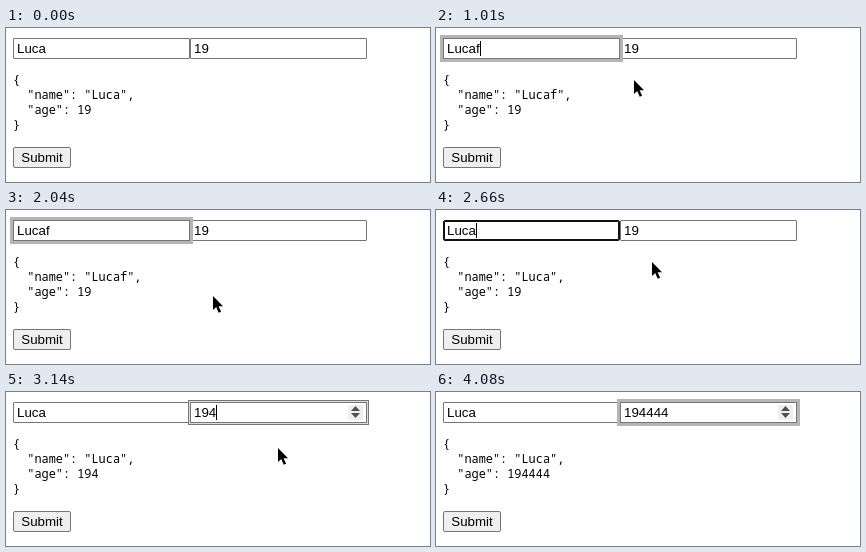
Write an HTML page that moves like this. It is 424x154 px and loops after 4250 ms.

```html
<!DOCTYPE html>
<html lang="en">
<head>
<meta charset="utf-8">
<title>Form demo</title>
<style>
  html, body { margin: 0; width: 100%; height: 100%; overflow: hidden; background: #fff; }
  body { position: relative; font: 13.333px/15px "Liberation Sans", Arial, sans-serif; color: #000; }
  .field, pre, .button, svg { position: absolute; box-sizing: border-box; }
  .field {
    top: 10px; width: 177px; height: 21px; padding: 2px 3px;
    border: 1px solid #767676; border-radius: 1px; background: #fff; white-space: pre;
  }
  #name { left: 7px; }
  #age { left: 184px; }
  .hover { border-color: #4f4f4f; }
  .focus, .fading, .dirty { z-index: 1; }
  .focus { border-color: #101010; border-radius: 2px; box-shadow: inset 0 0 0 1px #101010; }
  .fading, .dirty { border-radius: 0; }
  .fading { box-shadow: 0 0 0 1px #ddd, 0 0 0 2px #777; }
  .dirty { box-shadow: 0 0 0 3px #b5b5b5; }
  .text { display: inline-block; height: 15px; border-right: 1px solid transparent; }
  .caret { border-color: #000; }
  pre { left: 7px; top: 44px; margin: 0; font: 11.9px/15px "Noto Sans Mono", monospace; }
  .button {
    left: 7px; top: 119px; width: 58px; height: 21px; padding-top: 2px;
    border: 1px solid #767676; border-radius: 2px; background: #efefef; text-align: center;
  }
  svg { left: 0; top: 0; z-index: 2; }
</style>
</head>
<body>
<div class="field" id="name"><span class="text"></span></div>
<div class="field" id="age"><span class="text"></span></div>
<pre></pre>
<div class="button">Submit</div>
<svg width="424" height="154">
  <g id="spinner">
    <rect x="342" y="13" width="15" height="15" fill="#efefef"/>
    <path d="M345 19l4.5-5 4.5 5zM345 21l4.5 5 4.5-5z" fill="#505050"/>
  </g>
  <g id="pointer">
    <circle id="halo" r="11" fill="#fbf572"/>
    <path id="beam" d="M-3-7.5h2.5l1 1 1-1H4M.5-7V7M-3 7.5h2.5l1-1 1 1H4" fill="none" stroke="#000"/>
    <path id="arrow" d="M0 0V14l3.2-3 2.5 5.7 2.4-1-2.5-5.5H10z"/>
  </g>
</svg>
<script>
const LOOP = 4250;
const KEY_REPEAT = 157;
const MAX_REPEATS = 4;
const FADE = 70;
const CLICK_FLASH = 160;
const POINTER_STEP = 78.8;

const nameClick = 530, nameTyping = 940, nameErasing = 1720;
const ageClick = 2820, ageTyping = 3140;

// Pointer path as [time, x, y]; it moves in a straight line between points.
const path = [
  [50, 309, 132], [210, 81, 20], [690, 81, 20], [1002, 198, 52], [1396, 207, 86],
  [2420, 207, 86], [2657, 216, 52], [2820, 262, 21], [2950, 266, 24],
  [3300, 278, 87], [3450, 317, 88], [3610, 340, 127], [3690, 340, 127]
];

const $ = id => document.getElementById(id);
const show = (id, visible) => $(id).setAttribute("visibility", visible ? "inherit" : "hidden");
const within = (t, start, end) => t >= start && t < end;

// Key presses so far while a key is held down from the given time.
const presses = (t, start) =>
  Math.min(MAX_REPEATS, Math.max(0, Math.floor((t - start) / KEY_REPEAT) + 1));

function pointerAt(t) {
  const sampled = Math.floor((t + 22) / POINTER_STEP) * POINTER_STEP - 22;
  const next = path.findIndex(([time]) => time > sampled);
  if (next < 1) return null;
  const [t0, x0, y0] = path[next - 1];
  const [t1, x1, y1] = path[next];
  const k = (sampled - t0) / (t1 - t0);
  return [x0 + (x1 - x0) * k, y0 + (y1 - y0) * k];
}

function ring(t, extra, typing) {
  if (!extra) return "focus";
  return t < typing + FADE ? "fading" : "dirty";
}

function setField(id, value, state, caret) {
  $(id).className = "field " + state;
  const text = $(id).firstChild;
  text.textContent = value;
  text.className = caret ? "text caret" : "text";
}

function draw(t) {
  const extraName = presses(t, nameTyping) - presses(t, nameErasing);
  const extraAge = presses(t, ageTyping);
  const name = "Luca" + "f".repeat(extraName);
  const age = "19" + "4".repeat(extraAge);
  const inName = within(t, nameClick, ageClick);
  const inAge = t >= ageClick;
  const hover = within(t, 210, nameClick) ? "hover" : "";
  const blink = within(t, 2030, 2185) || t >= 4075;

  setField("name", name, inName ? ring(t, extraName, nameTyping) : hover, inName && !blink);
  setField("age", age, inAge ? ring(t, extraAge, ageTyping) : "", inAge && !blink);
  document.querySelector("pre").textContent = JSON.stringify({ name, age: +age }, null, 2);
  show("spinner", inAge);

  const position = pointerAt(t);
  $("pointer").setAttribute("visibility", position ? "visible" : "hidden");
  const [x, y] = (position || [0, 0]).map(Math.round);
  $("pointer").setAttribute("transform", `translate(${x} ${y})`);
  const overField = y < 31;
  show("halo", position && [nameClick, ageClick].some(c => within(t, c, c + CLICK_FLASH)));
  show("beam", position && overField);
  show("arrow", position && !overField);
}

function tick() {
  draw(performance.now() % LOOP);
  requestAnimationFrame(tick);
}
tick();
</script>
</body>
</html>
```
